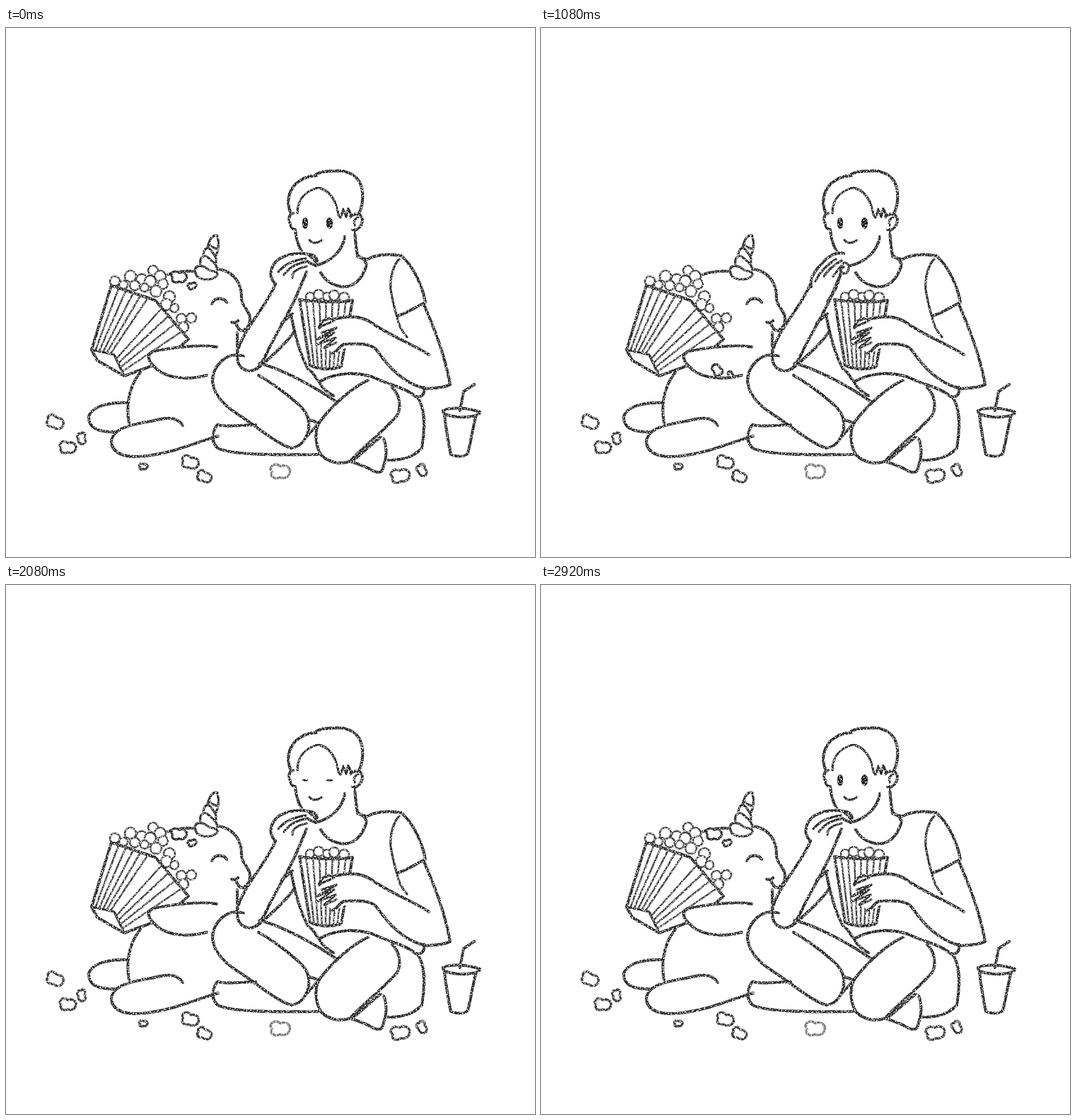
An HTML page that plays this animation: 748x748 px, repeating every 3000 ms.

```html
<!DOCTYPE html>
<html lang="en">
<head>
<meta charset="utf-8">
<title>Popcorn picnic</title>
<style>
  html, body { margin: 0; width: 100%; height: 100%; overflow: hidden; background: #fff; }
  svg { display: block; width: 100%; height: 100%; }
  svg > g, .ink { fill: none; stroke: #262626; stroke-width: 4.1; stroke-linecap: round; stroke-linejoin: round; }
  .fill { fill: #fff; }
  .thin { stroke-width: 2.6; stroke: #3a3a3a; }
  .mid { stroke-width: 3.3; }
  .kernel { vector-effect: non-scaling-stroke; stroke-width: 3.4; fill: #fff; }
  .eye { fill: #111; stroke: none; }
</style>
</head>
<body>
<svg viewBox="0 0 748 748">
  <defs>
    <filter id="grain" x="0" y="0" width="100%" height="100%" color-interpolation-filters="sRGB">
      <feTurbulence type="fractalNoise" baseFrequency=".55" numOctaves="2" seed="4"/>
      <feColorMatrix values="0 0 0 0 1  0 0 0 0 1  0 0 0 0 1  5 0 0 0 -2.5"/>
    </filter>
    <path id="kernel" class="kernel" d="M-11-3C-9-10-3-9 1-6C7-9 13-4 12 1C11 7 5 9 0 7C-6 10-12 6-9 1Z"/>
  </defs>

  <g id="floor"></g>

  <!-- unicorn -->
  <g>
    <path d="M190 487C175 505 169 532 174 558M172 530C150 529 123 533 117 549C116 566 132 572 155 571"/>
    <path d="M250 562C241 548 224 551 205 556C181 560 150 565 149 585C150 601 166 607 190 606C230 603 266 587 300 577"/>
    <path d="M227 349C240 345 254 343 267 344M299 341C319 343 331 357 333 376C332 386 335 391 340 398C347 408 347 420 338 426M319 416C323 417 327 417 328 414M326 420C328 426 334 431 340 426M327 431L327 458"/>
    <path d="M291 390C295 380 308 381 312 388"/>
    <path class="mid" d="M267 344C267 334 278 335 285 341C292 346 299 342 299 349C294 357 278 358 270 351ZM276 337C272 327 278 319 285 324C291 329 297 333 299 341M279 321C280 309 287 309 291 316C295 321 298 325 297 332M285 310C288 298 293 291 299 294C302 305 300 317 296 323M287 305C290 309 294 312 299 312"/>
  </g>
  <g id="bags"></g>
  <g>
    <path class="fill" stroke="none" d="M299 452C270 448 235 452 210 457C198 460 200 470 208 478C222 495 254 499 284 491"/>
    <path d="M298 451C270 447 235 452 209 457C198 461 201 471 209 478C223 495 254 499 284 491"/>
  </g>

  <!-- legs, shirt -->
  <g>
    <path d="M336 464C312 456 292 478 292 499C294 522 313 537 332 549C358 566 380 586 403 594C416 593 425 582 428 567C430 550 423 540 411 530C392 513 376 502 357 491"/>
    <path d="M358 474C390 482 438 508 466 528M443 501C447 510 455 515 463 520M429 554L441 558M441 560L425 578"/>
    <path d="M298 562C291 573 290 584 299 594C320 604 382 604 441 603M299 561C315 565 338 561 353 561"/>
    <path d="M546 508C556 518 560 535 553 548C535 569 505 592 487 612C475 618 456 615 445 603C436 586 436 567 445 555C465 530 490 508 512 498"/>
    <path d="M487 613C497 616 508 620 515 624C523 629 532 631 533 622C538 608 540 595 534 581M491 611C505 600 518 588 530 578"/>
    <path d="M581 521C594 537 592 570 588 594C575 608 556 612 540 611"/>
    <path d="M403 405C408 432 416 462 427 482C437 488 436 495 443 500C468 486 497 486 520 494C542 505 564 508 579 521C587 524 593 517 591 508"/>
  </g>

  <!-- head, torso -->
  <g>
    <path d="M403 262C396 248 399 231 410 220C420 212 430 208 439 209M436 209C445 201 457 203 470 202C492 202 503 216 504 233C505 246 503 256 498 264"/>
    <path class="mid" d="M412 262C412 246 420 232 440 226C455 227 467 242 470 264L473 268L477 256L481 267L484 255L488 264"/>
    <path d="M487 267C492 261 504 262 504 272C503 281 497 287 490 285M406 262C400 263 399 270 402 277C403 283 406 285 409 285C410 297 413 308 419 318"/>
    <path class="mid" d="M498 268C493 269 491 274 493 279"/>
    <path d="M493 286C494 300 495 312 497 321C501 326 506 326 511 327C528 318 547 320 559 322C577 338 589 365 593 388C580 394 567 403 554 407M497 323C504 325 507 328 510 334C505 352 496 364 480 366C466 366 452 359 445 346"/>
    <path class="mid" d="M556 327C546 337 543 356 544 370C546 385 550 398 553 409C555 420 560 429 567 437"/>
    <path id="jaw"/>
    <path class="mid" id="mouth" d="M429 300C433 305 441 305 447 300"/>
    <ellipse class="eye" cx="423" rx="4.2" ry="8"/>
    <ellipse class="eye" cx="457.500" rx="4.800" ry="8"/>
  </g>

  <!-- small tub and the hand round it -->
  <g id="tub"></g>
  <g>
    <path class="fill" stroke="none" d="M443 424C445 413 455 409 466 412C490 405 512 411 530 426L525 458C512 442 490 446 472 457L462 460L450 450L440 441Z"/>
    <path d="M443 424C445 413 455 409 463 412C485 406 505 407 520 419C545 436 575 447 598 462M591 391C604 422 619 456 628 504C620 509 605 509 594 510C562 503 541 479 526 458C517 443 492 447 478 447C471 450 468 458 462 460"/>
    <path class="mid" d="M443 423L464 414M446 431L467 424L440 440L464 431L441 447L466 438L450 452L467 445"/>
  </g>

  <!-- eating arm -->
  <g>
    <path d="M381 362C372 386 346 415 334 440C322 462 325 483 345 485C357 484 362 474 371 455C383 430 402 400 411 378L425 345M355 482C374 466 396 446 407 430M405 404L389 418"/>
    <g id="bite">
      <path d="M381 362C369 350 375 334 387 326C398 320 412 317 428 320C438 320 444 330 436 335L427 331"/>
      <path class="mid" d="M385 345C394 334 407 328 424 326M393 349C401 338 412 332 427 330M405 353C404 345 412 340 425 337M429 322L437 330"/>
    </g>
    <g id="reach">
      <path d="M382 366C379 350 392 339 402 328C409 321 420 316 428 319M423 349C421 362 413 376 405 387"/>
      <path class="mid" d="M388 358C394 345 404 335 417 327M400 351C406 342 414 335 425 329M413 351L428 332C436 330 437 342 432 346C424 350 420 341 428 338"/>
    </g>
  </g>

  <!-- drink -->
  <g>
    <path d="M618 541C626 536 652 536 670 543C671 548 655 551 641 550C626 549 617 546 618 541M620 548C623 570 626 590 629 603C638 607 648 606 653 602L664 550M642 541L647 514L662 504"/>
  </g>

  <g><use href="#kernel" id="big"/><use href="#kernel" id="small"/></g>
  <rect width="748" height="748" filter="url(#grain)"/>
</svg>
<script>
const el = id => document.getElementById(id);
const mix = (a, b, t) => [a[0] + (b[0] - a[0]) * t, a[1] + (b[1] - a[1]) * t];
const circles = list => list.map(([x, y, r]) => `<circle class="fill thin" cx="${x}" cy="${y}" r="${r}"/>`).join('');
const outline = (points, close = '') => `M${points.join('L')}${close}`;

// Lines running from edge a-b to edge c-d
function stripes(a, b, c, d, count) {
  let path = '';
  for (let i = 1; i < count; i++) path += outline([mix(a, b, i / count), mix(c, d, i / count)]);
  return `<path class="thin" d="${path}"/>`;
}

const heap = circles([[176,351,8], [208,343,7], [192,356,8], [218,351,8], [154,358,7], [204,358,8],
  [166,363,6], [182,364,7], [222,362,7], [196,367,6], [212,372,8], [231,380,8], [227,391,8], [238,396,6]]);
const sidePieces = circles([[248,411,7], [262,410,7], [251,423,7]]);

function bag(id, shift, left, fold, right, bottomLeft, bottomFold, bottomRight, corner) {
  const shape = [left, fold, right, [222, 472], bottomRight, corner, bottomLeft];
  return `<g id="${id}"><g transform="translate(${shift} 0)">${heap}</g>${sidePieces}
    <path class="fill" d="${outline(shape, 'Z')}"/>
    ${stripes(left, fold, bottomLeft, bottomFold, 6)}${stripes(fold, right, bottomFold, bottomRight, 5)}
    <path class="mid" d="${outline([bottomLeft, bottomFold, bottomRight])}"/></g>`;
}
el('bags').innerHTML =
  bag('rest', 0, [149,364], [211,385], [258,440], [121,455], [153,462], [167,492], [129,470]) +
  bag('tilt', 7, [160,364], [221,385], [259,439], [124,448], [157,456], [178,490], [131,462]);

el('tub').innerHTML = circles([[430,380,6], [442,377,7], [454,380,6], [464,378,7], [478,381,7]]) +
  '<path class="fill" d="M415 384C432 387 470 389 490 385L474 479C460 484 441 483 430 477Z"/>' +
  stripes([415,385], [490,386], [430,478], [474,480], 8);

el('floor').innerHTML = [[69,557,1.05,20], [107,580,.7,80], [87,593,1,0], [194,620,.5,0], [260,614,1.05,10],
  [280,634,.9,20], [387,627,1.2,0,'#777'], [557,633,1.15,-10], [588,625,.75,60]]
  .map(([x, y, size, turn, color = '#333']) =>
    `<use href="#kernel" stroke="${color}" transform="translate(${x} ${y}) rotate(${turn}) scale(${size})"/>`).join('');

const STEPS = 36, LOOP = 3000;
const eyes = document.querySelectorAll('.eye');
const show = (id, on) => el(id).style.display = on ? '' : 'none';
const place = (id, x, y, turn, size) =>
  el(id).setAttribute('transform', `translate(${x} ${y}) rotate(${turn}) scale(${size})`);

function draw(step) {
  const tilted = step % 10 > 5;
  show('rest', !tilted);
  show('tilt', tilted);

  const reaching = step > 8 && step < 15;
  show('bite', !reaching);
  show('reach', reaching);

  const chew = [2, 3].includes(step % 7) ? 4 : 0;
  el('jaw').setAttribute('d', `M479 295C${477 + chew * 2} 312 ${462 + chew} 330 438 336`);
  el('mouth').setAttribute('transform', `translate(0 ${chew / 3})`);

  const blink = [3, 16, 25].includes(step);
  eyes.forEach(eye => eye.setAttribute('transform', `translate(0 276) scale(1 ${blink ? .2 : 1})`));

  // Two pieces slip from the bag, rest on the head, then drop
  const dropping = step > 2 && step < 16;
  const fall = dropping ? Math.max(0, step - 5) : 0;
  const fresh = step > 20 && step < 24;
  show('big', step < 16 || step > 20);
  show('small', step < 16 || step > 20);
  if (dropping) {
    place('big', 245 + fall / 2, 356 + 2 * fall ** 2, 75 + fall * 20, .75);
    place('small', 267 + fall / 8, 370 + 1.88 * fall ** 2, fall * 30, .4);
  } else {
    place('big', fresh ? 246 : 244, 352, fresh ? 20 : 0, fresh ? .8 : .95);
    place('small', fresh ? 261 : 263, 364.5, -20, .53);
  }
}

let current = -1;
function tick() {
  const step = Math.floor((performance.now() % LOOP + 4) * STEPS / LOOP) % STEPS;
  if (step !== current) draw(current = step);
  requestAnimationFrame(tick);
}
tick();
</script>
</body>
</html>
```
